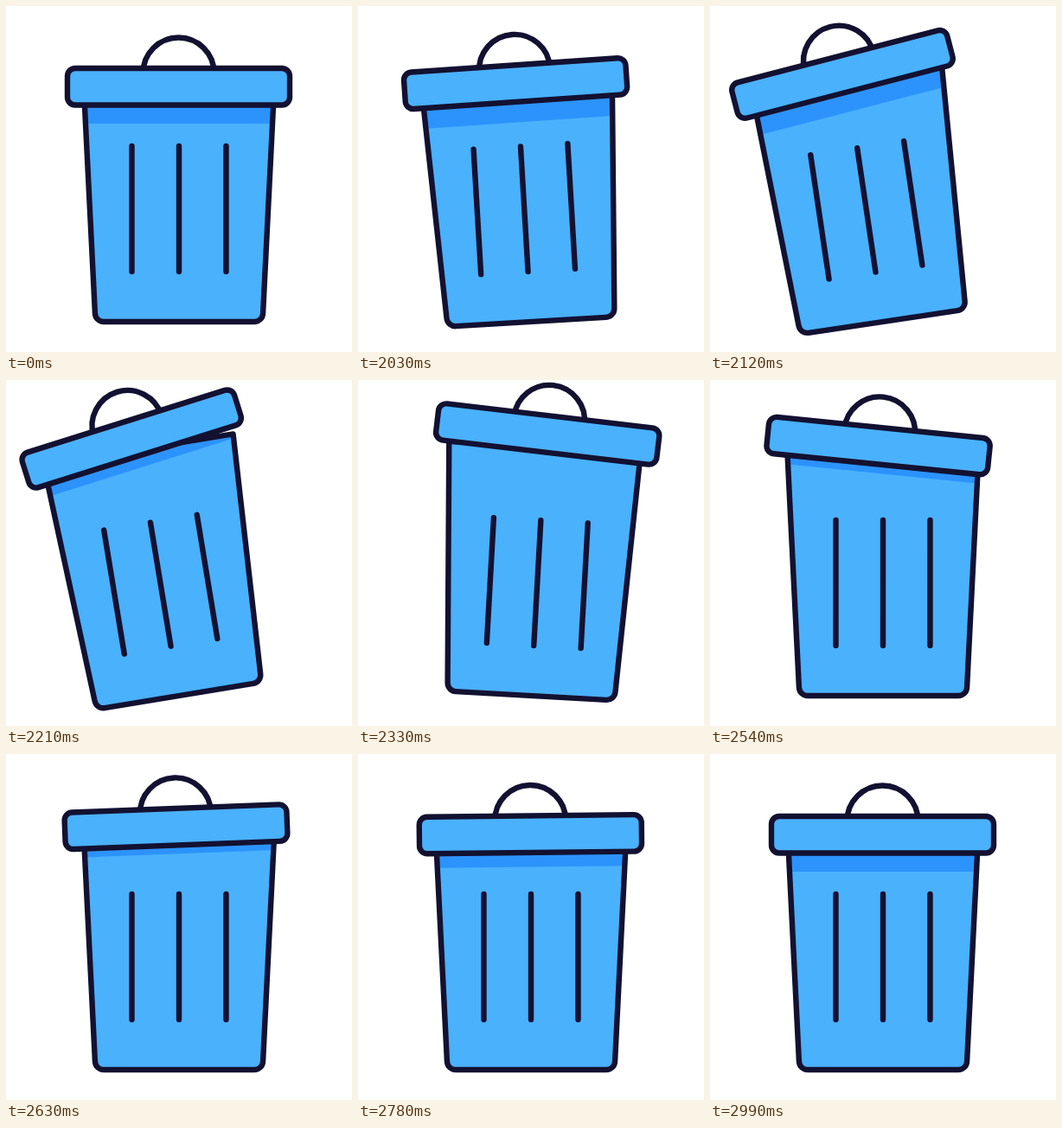
An HTML page with a canvas that plays this animation: 400 px wide and 400 px high, repeating every 3080 ms.

```html
<!DOCTYPE html>
<html lang="en">
<head>
<meta charset="utf-8">
<title>Trash can</title>
<style>
  html, body { margin: 0; width: 100%; height: 100%; overflow: hidden; background: #fff; }
  canvas { display: block; width: 400px; height: 400px; }
</style>
</head>
<body>
<canvas id="stage" width="400" height="400"></canvas>
<script>
const ctx = document.getElementById('stage').getContext('2d');
const LOOP = 3080, START = 2030, STEP = 30;
const BLUE = '#4ab1fd', SHADE = '#2c93fc', INK = '#131131';
const RAD = Math.PI / 180;

// Sine ease from 0 to 1 between two times.
function ease(t, from, to) {
  const u = Math.min(1, Math.max(0, (t - from) / (to - from)));
  return (1 - Math.cos(Math.PI * u)) / 2;
}

// The can rocks left, then right, and settles.
function sway(t) {
  return -10 * ease(t, 1927, 2187) + 14 * ease(t, 2187, 2356) - 4 * ease(t, 2356, 2544);
}

// The lid hops once, rocking and sliding as it falls back.
function lift(t) {
  return 32 * (ease(t, 1960, 2255) - ease(t, 2280, 2825));
}

function tilt(t) {
  return -8.5 * ease(t, 2000, 2187) + 20.9 * ease(t, 2187, 2448)
    - 14.8 * ease(t, 2448, 2645) + 2.4 * ease(t, 2645, 2850);
}

function slide(t) {
  return -5.3 * ease(t, 1960, 2200) + 8.1 * ease(t, 2200, 2330)
    - 8.5 * ease(t, 2330, 2455) + 5.7 * ease(t, 2455, 2815);
}

// The shadow draws up under the lid and returns in two stages.
function shrink(t) {
  return 55 * ease(t, 1987, 2340) - 26 * ease(t, 2340, 2480) - 29 * ease(t, 2480, 2900);
}

function bodyPath() {
  ctx.beginPath();
  ctx.moveTo(200, 76.6);
  ctx.lineTo(311, 76.6);
  ctx.arcTo(296.6, 365, 200, 365, 10);
  ctx.arcTo(103.4, 365, 89, 76.6, 10);
  ctx.lineTo(89, 76.6);
  ctx.closePath();
}

function drawShadow(depth, angle) {
  const slant = 111 * Math.tan(angle);
  ctx.save();
  ctx.clip();
  ctx.beginPath();
  ctx.moveTo(89, 70);
  ctx.lineTo(311, 70);
  ctx.lineTo(311, depth + slant);
  ctx.lineTo(89, depth - slant);
  ctx.fillStyle = SHADE;
  ctx.fill();
  ctx.restore();
}

function drawBody(depth, angle) {
  bodyPath();
  ctx.fillStyle = BLUE;
  ctx.fill();
  drawShadow(depth, angle);
  bodyPath();
  ctx.stroke();

  ctx.beginPath();
  for (let i = -1; i <= 1; i++) {
    const x = 200 + i * 54.5;
    ctx.moveTo(x, 162);
    ctx.lineTo(x, 307);
  }
  ctx.stroke();
}

function drawLid() {
  ctx.beginPath();
  ctx.arc(0, -15.75, 41, Math.PI, 0);
  ctx.stroke();

  ctx.beginPath();
  ctx.roundRect(-128.5, -21.25, 257, 42.5, 9);
  ctx.fillStyle = BLUE;
  ctx.fill();
  ctx.stroke();
}

function draw(t) {
  const angle = tilt(t) * RAD;
  ctx.fillStyle = '#fff';
  ctx.fillRect(0, 0, 400, 400);
  ctx.strokeStyle = INK;
  ctx.lineWidth = 6.4;
  ctx.lineCap = ctx.lineJoin = 'round';

  ctx.save();
  ctx.translate(200, 365);
  ctx.rotate(sway(t) * RAD);
  ctx.translate(-200, -365);
  drawBody(136 - shrink(t), angle);

  ctx.translate(199.5 + slide(t), 93.25 - lift(t));
  ctx.rotate(angle);
  drawLid();
  ctx.restore();
}

function frame() {
  const t = performance.now() % LOOP;
  draw(t < START ? 0 : START + Math.floor((t - START) / STEP) * STEP);
  requestAnimationFrame(frame);
}
frame();
</script>
</body>
</html>
```
